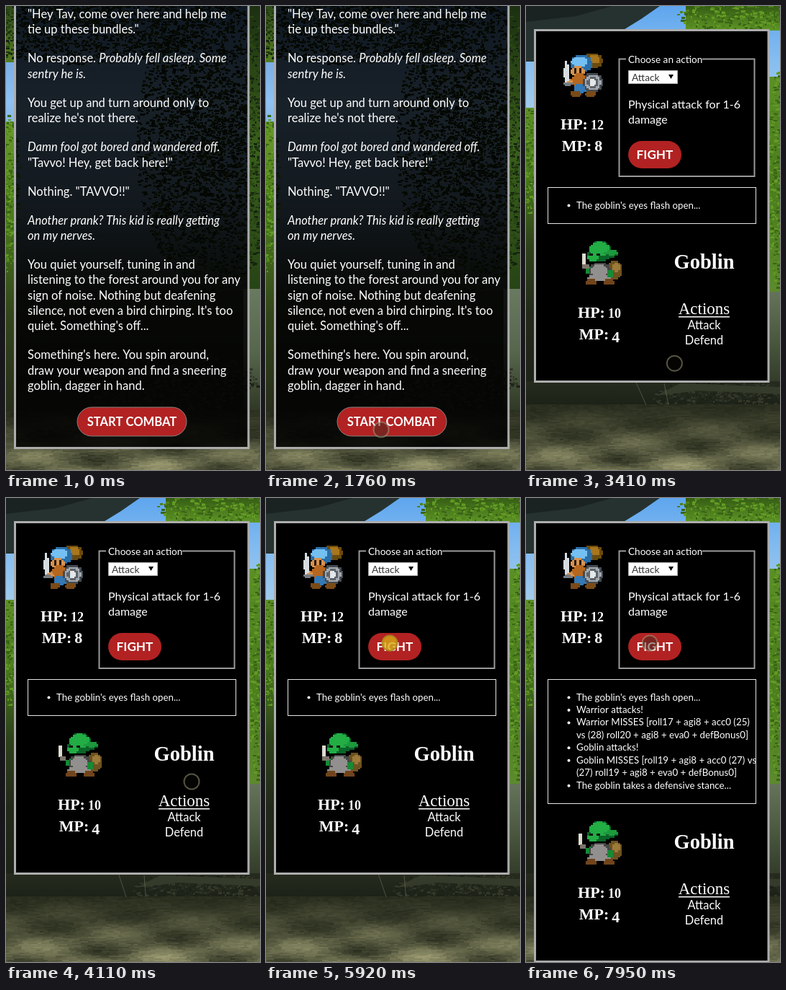
Animation, 353 px wide and 643 px high, one loop 8 s. Source, as an HTML page with a canvas:

```html
<!DOCTYPE html>
<html lang="en">
<head>
<meta charset="utf-8">
<title>Forest encounter</title>
<style>
  html, body { margin: 0; width: 100%; height: 100%; overflow: hidden; background: #000; }
  canvas { display: block; }
</style>
</head>
<body>
<canvas id="stage" width="353" height="643"></canvas>
<script>
const W = 353, H = 643, LOOP = 8000;
const COMBAT_AT = 2150, LOG_AT = 6080, PRESS = 230;
const stage = document.getElementById('stage').getContext('2d');
const SANS = 'Lato, sans-serif', SERIF = '"Liberation Serif", serif';

const STORY = [
  ['"Hey Tav, come over here and help me', 'tie up these bundles."'],
  ['No response. *Probably fell asleep. Some', '*sentry he is.'],
  ['You get up and turn around only to', "realize he's not there."],
  ['*Damn fool got bored and wandered off.', '"Tavvo! Hey, get back here!"'],
  ['Nothing. "TAVVO!!"'],
  ['*Another prank? This kid is really getting', '*on my nerves.'],
  ['You quiet yourself, tuning in and', 'listening to the forest around you for any',
   'sign of noise. Nothing but deafening', "silence, not even a bird chirping. It's too",
   "quiet. Something's off..."],
  ["Something's here. You spin around,", 'draw your weapon and find a sneering', 'goblin, dagger in hand.'],
];
const LOG = [
  ["The goblin's eyes flash open..."],
  ['Warrior attacks!'],
  ['Warrior MISSES [roll17 + agi8 + acc0 (25)', 'vs (28) roll20 + agi8 + eva0 + defBonus0]'],
  ['Goblin attacks!'],
  ['Goblin MISSES [roll19 + agi8 + acc0 (27) vs', '(27) roll19 + agi8 + eva0 + defBonus0]'],
  ['The goblin takes a defensive stance...'],
];

function seeded(seed) {
  return () => (seed = (seed * 16807) % 2147483647) / 2147483647;
}
function rect(g, color, x, y, w, h) {
  g.fillStyle = color;
  g.fillRect(x, y, w, h);
}
function polygon(g, color, ...points) {
  g.fillStyle = color;
  g.beginPath();
  points.forEach(([x, y]) => g.lineTo(x, y));
  g.fill();
}
function text(str, x, y, font, color = '#fff', align = 'left') {
  stage.font = font;
  stage.fillStyle = color;
  stage.textAlign = align;
  stage.fillText(str, x, y);
  return stage.measureText(str).width;
}

// ---- Forest ----
function makeBackdrop(story) {
  const canvas = document.createElement('canvas');
  canvas.width = W;
  canvas.height = H;
  const g = canvas.getContext('2d'), random = seeded(41);

  // Vertical gradient with evenly spaced colours.
  const wash = (x, y, w, h, ...colors) => {
    const fill = g.createLinearGradient(0, y, 0, y + h);
    colors.forEach((color, i) => fill.addColorStop(i / (colors.length - 1), color));
    rect(g, fill, x, y, w, h);
  };
  // Clumps scattered in an ellipse, thinning out towards its edge.
  const scatter = (cx, cy, rx, ry, ...colors) => {
    for (let i = rx * ry / 5; i > 0; i--) {
      const angle = random() * 2 * Math.PI, reach = random() ** .6;
      const color = colors[random() * colors.length | 0];
      rect(g, color, cx + rx * reach * Math.cos(angle) | 0, cy + ry * reach * Math.sin(angle) | 0,
        2 + random() * 4 | 0, 2 + random() * 2 | 0);
    }
  };
  const bright = ['#3a6516', '#4e821c', '#639b24'], shade = ['#142410', '#1e3512', '#2a4714'];
  const rock = ['#1c2118', '#272c20', '#333829'];

  if (story) {
    wash(0, 0, W, 400, '#5e93d0', '#8fc1f2', '#6f97b8', '#2c3a2a');
    wash(0, 395, W, 248, '#2d3722', '#20251a', '#2a2e1f');
    wash(0, 0, 14, 78, '#2f4a1a', '#557c22');
    wash(0, 160, 14, 400, '#6a9a28', '#4b7a1c', '#33451b', '#272d1a');
    wash(337, 0, 16, 392, '#1c3011', '#39601a', '#274415');
    wash(330, 392, 23, 175, '#687a60', '#56664c', '#2c3422');
    scatter(100, 20, 180, 60, ...shade);
    scatter(285, 190, 105, 205, ...shade);
    scatter(4, 260, 14, 110, ...bright);
    scatter(220, 520, 130, 45, ...rock);
  } else {
    wash(0, 0, W, 150, '#5fa6ee', '#86bdf0', '#a5cdea');
    wash(0, 141, 14, 380, '#5f9026', '#4a7a1c', '#2e421a', '#23291a', '#1e2318');
    wash(337, 98, 16, 298, '#5b8f26', '#4a7d1c', '#5c8a2c');
    wash(337, 396, 16, 125, '#64735a', '#4b5a40', '#333c2a');
    wash(222, 0, 131, 34, '#355c14', '#5f9626');
    polygon(g, '#26322f', [0, 0], [186, 0], [160, 18], [134, 34], [12, 34], [12, 77], [0, 77]);
    polygon(g, '#1a2322', [0, 0], [120, 0], [70, 14], [0, 22]);
    scatter(290, 14, 80, 22, ...bright);
    scatter(350, 240, 14, 150, ...bright);
    scatter(4, 215, 12, 75, ...bright);
    wash(0, 520, W, 40, '#262b1e', '#1b2017');
    scatter(270, 540, 95, 24, ...rock);
    polygon(g, '#353b2a', [180, 540], [215, 523], [353, 528], [353, 538], [240, 533]);
  }
  return canvas;
}
const forest = makeBackdrop(true), clearing = makeBackdrop(false);

// Rippling water: waves of light that grow stronger towards the viewer.
function drawWater(t, top) {
  const random = seeded(97), phase = Math.floor(t / 75) * Math.PI / 4;
  rect(stage, '#23281a', 0, top, W, H - top);
  for (let y = top; y < H; y += 2) {
    const near = (y - top) / (H - top);
    for (let x = -random() * 8 | 0; x < W;) {
      const length = 4 + random() * 9 | 0;
      const wave = Math.sin(x / 41 + y / 7) + Math.sin(x / 23 - y / 11 + .5 * Math.sin(phase));
      const light = near * (.36 + .17 * wave + .16 * random()) + .06 * random();
      rect(stage, `rgba(186,184,136,${Math.max(0, light).toFixed(3)})`, x, y, length, 2);
      x += length;
    }
  }
}
function drawDrips(t) {
  const sway = Math.sin(t / 300) * 2;
  stage.strokeStyle = 'rgba(160,170,135,.35)';
  stage.lineWidth = 1;
  stage.beginPath();
  stage.moveTo(155 + sway, 522);
  stage.lineTo(167, 553);
  stage.moveTo(192, 523);
  stage.lineTo(196 - sway, 552);
  stage.stroke();
}

// ---- Interface ----
function frame(x, y, w, h, color, width) {
  stage.strokeStyle = color;
  stage.lineWidth = width;
  stage.strokeRect(x, y, w, h);
}
function panel(y, h, fill) {
  rect(stage, fill, 12, y, 326, h);
  frame(12.5, y + 1.5, 324.5, h - 3, '#adadad', 3);
}
function button(label, x, y, w, h, size, edge) {
  stage.beginPath();
  stage.roundRect(x, y, w, h, h / 2);
  stage.fillStyle = '#b22222';
  stage.fill();
  if (edge) {
    stage.strokeStyle = '#85817e';
    stage.lineWidth = 1;
    stage.stroke();
  }
  text(label, x + w / 2, y + h / 2 + 5.5, `bold ${size}px ${SANS}`, '#fff', 'center');
}

// Old-style figures: 0-2 are low, 4 hangs below the baseline.
function stat(label, digits, center, y) {
  const big = `bold 22px ${SERIF}`, low = `bold 18px ${SERIF}`, gap = 4;
  const digitFont = digits < '3' ? low : big;
  stage.font = big;
  const labelWidth = stage.measureText(label).width;
  stage.font = digitFont;
  const left = center - (labelWidth + gap + stage.measureText(digits).width) / 2;
  text(label, left, y, big);
  text(digits, left + labelWidth + gap, y + (digits === '4' ? 4 : 0), digitFont);
}

// ---- Sprites: ellipses snapped to a coarse grid ----
const CELL = 2.5;
function blob(color, cx, cy, rx, ry = rx) {
  stage.fillStyle = color;
  for (let y = Math.floor((cy - ry) / CELL); y * CELL < cy + ry; y++)
    for (let x = Math.floor((cx - rx) / CELL); x * CELL < cx + rx; x++)
      if (Math.hypot(((x + .5) * CELL - cx) / rx, ((y + .5) * CELL - cy) / ry) <= 1)
        stage.fillRect(Math.floor(x * CELL), Math.floor(y * CELL), 3, 3);
}
function at(x, y, draw) {
  stage.save();
  stage.translate(x, y);
  draw();
  stage.restore();
}
function drawWarrior(step) {
  blob('#6b4a0e', 40, 10, 14, 11);
  blob('#a8761d', 42, 8, 9, 5);
  blob('#2b6ea8', 25, 14, 15, 12);
  blob('#74c0f2', 22, 11, 11, 7);
  blob('#d8924e', 20, 25, 10, 7);
  for (const x of [16, 24]) blob('#241913', x, 24, 2, 3);
  blob('#b5661f', 23, 37, 12, 9);
  blob('#3679b4', 25, 48, 11, 6);
  blob('#d8924e', 9, 40 + step, 5, 4);
  blob('#d7dce0', 4, 26 + step, 3, 16);
  blob('#777d84', 6, 42 + step, 6, 2.5);
  ['#454b52', '#a3a9ae', '#5d636a', '#e4e7ea'].forEach((color, i) => blob(color, 41, 40, 13.5 - i * 3));
  for (const x of [17 - step, 38]) blob('#7a4a18', x, 56, 7, 4);
}
function drawGoblin(step) {
  const reach = step ? 0 : 4;
  blob('#6d5220', 50, 40, 10, 13);
  blob('#9c7a38', 52, 36, 5, 6);
  blob('#168a35', 17, 41, 8, 5);
  blob('#484644', 30, 42, 15, 13);
  blob('#92908e', 29, 41, 11, 9);
  blob('#92908e', 29, 51, 17, 4);
  blob('#0b6428', 34, 18, 22, 5);
  blob('#0b6428', 30, 14, 16, 14);
  blob('#22ad45', 29, 11, 14, 10);
  blob('#22ad45', 20, 22, 8, 5);
  blob('#1c9a3d', 46, 16, 10, 3);
  for (const x of [18, 28]) blob('#160f0c', x, 19, 3, 2);
  blob('#168a35', 44, 45, 4, 6);
  blob('#dedbd0', 3 + reach, 25, 3, 9);
  blob('#7b746a', 6 + reach, 35, 5, 3);
  for (const x of [18, 43]) blob('#71441c', x, 57, 8, 4);
}

// ---- Scenes ----
function drawStory(t) {
  stage.drawImage(forest, 0, 0);
  drawWater(t, 560);
  panel(-20, 634, 'rgba(0,0,0,.83)');
  let y = 17;
  for (const paragraph of STORY) {
    for (const line of paragraph) {
      let x = 30;
      line.split('*').forEach((run, i) => {
        x += text(run, x, y, `${i % 2 ? 'italic ' : ''}16.5px ${SANS}`);
      });
      y += 21.3;
    }
    y += 18.8;
  }
  button('START COMBAT', 99, 556, 152, 40, 16.6, true);
}

function drawLog(entries) {
  let y = 280.5;
  for (const entry of entries) {
    stage.beginPath();
    stage.arc(59.5, y - 4, 2, 0, 7);
    stage.fillStyle = '#fff';
    stage.fill();
    for (const line of entry) {
      text(line, 70, y, `13.3px ${SANS}`);
      y += 17.45;
    }
  }
}

function drawCombat(t) {
  const grown = t >= LOG_AT, shift = grown ? 122 : 0;
  const step = Math.floor(t / 600 + .35) % 2;
  stage.drawImage(clearing, 0, 0);
  drawWater(t, 552);
  drawDrips(t);
  panel(32, 490 + shift, '#000');

  at(52, 66, () => drawWarrior(step));
  stat('HP:', '12', 78, 171);
  stat('MP:', '8', 78, 201);

  frame(129.5, 73.5, 188, 162.5, '#9a9a9a', 2);
  rect(stage, '#000', 139, 70, 106, 8);
  text('Choose an action', 142, 79, `13.6px ${SANS}`);
  rect(stage, '#fff', 142, 89, 69, 19);
  frame(142.5, 89.5, 68, 18, '#aaa', 1);
  text('Attack', 147, 104, `13.7px ${SANS}`, '#333');
  polygon(stage, '#000', [198, 95], [205, 95], [201.5, 101]);
  text('Physical attack for 1-6', 142, 142, `16px ${SANS}`);
  text('damage', 142, 163, `16px ${SANS}`);
  button('FIGHT', 142, 187, 74, 38, 17.2);

  frame(30.5, 251.5, 289, 50 + shift, '#e4e4e4', 1);
  drawLog(grown ? LOG : LOG.slice(0, 1));

  at(0, shift, () => {
    at(73, 326, () => drawGoblin(step));
    stat('HP:', '10', 102, 432);
    stat('MP:', '4', 102, 462);
    text('Goblin', 247.5, 364, `bold 28.5px ${SERIF}`, '#fff', 'center');
    text('Actions', 247.5, 427, `23px ${SERIF}`, '#fff', 'center');
    rect(stage, '#fff', 212, 430, 71, 1.5);
    text('Attack', 247.5, 448, `16.4px ${SANS}`, '#fff', 'center');
    text('Defend', 247.5, 469, `16.4px ${SANS}`, '#fff', 'center');
  });
}

// ---- Pointer ----
const glide = (t, start, end) => {
  const p = Math.min(1, Math.max(0, (t - start) / (end - start)));
  return p * p * (3 - 2 * p);
};
function drawPointer(t) {
  if (t < 1360) return;
  const enter = glide(t, 1360, 1640), toGoblin = glide(t, 2760, 4110);
  const toMenu = glide(t, 4110, 4700), toFight = glide(t, 4850, 5200);
  const x = 196 - 36 * enter + 98 * toGoblin - 70 * toMenu - 16 * toFight;
  const y = 660 - 73 * enter - 194 * toGoblin - 288 * toMenu + 96 * toFight;
  const pressed = [COMBAT_AT, LOG_AT].some(end => t >= end - PRESS && t < end);
  const overButton = t < COMBAT_AT || toFight === 1;
  stage.beginPath();
  stage.arc(x, y, 10.5, 0, 7);
  stage.fillStyle = pressed ? 'rgba(214,172,24,.8)' : overButton ? 'rgba(65,40,30,.5)' : 'rgba(30,30,15,.15)';
  stage.fill();
  stage.strokeStyle = pressed ? 'rgba(170,135,30,.9)' : 'rgba(170,164,132,.5)';
  stage.lineWidth = 2;
  stage.stroke();
}

function render() {
  const t = performance.now() % LOOP;
  (t < COMBAT_AT ? drawStory : drawCombat)(t);
  drawPointer(t);
  requestAnimationFrame(render);
}
render();
</script>
</body>
</html>
```
